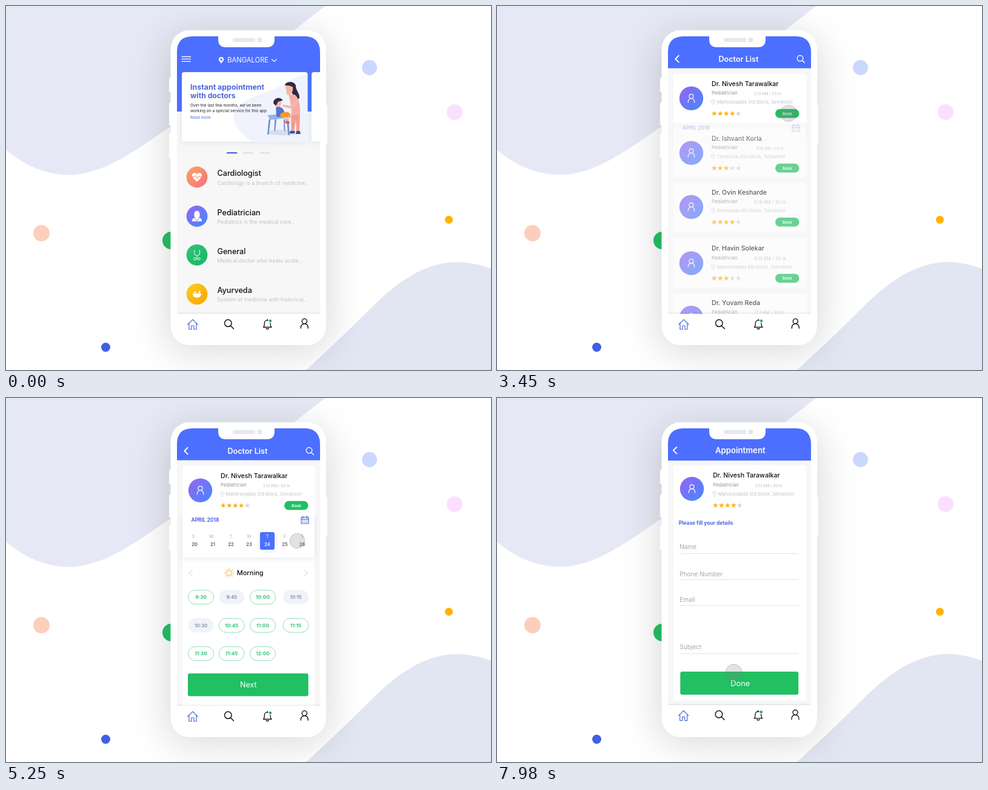
Write an HTML page that moves like this. It is 800x600 px and loops after 8 s.

```html
<!DOCTYPE html>
<html lang="en">
<head>
<meta charset="utf-8">
<title>Doctor booking app</title>
<style>
html, body { margin: 0; width: 100%; height: 100%; overflow: hidden; background: #fff; }
svg { display: block; width: 100vw; height: 100vh; font-family: Inter, "Open Sans", sans-serif; }
.line { fill: none; stroke-linecap: round; stroke-linejoin: round; }
</style>
</head>
<body>
<svg id="stage" viewBox="0 0 800 600"></svg>
<script>
const BLUE = '#4c6fff', GREEN = '#22bf63', INK = '#4a66dc';

// ---- markup helpers ----
const text = (x, y, size, str, fill = '#111', weight = 400, anchor = 'start') =>
  `<text x="${x}" y="${y}" font-size="${size}" fill="${fill}" font-weight="${weight}" text-anchor="${anchor}">${str}</text>`;
const mid = (x, y, size, str, fill, weight) => text(x, y, size, str, fill, weight, 'middle');
const rect = (x, y, w, h, r, fill, extra = '') =>
  `<rect x="${x}" y="${y}" width="${w}" height="${h}" rx="${r}" fill="${fill}" ${extra}/>`;
const circle = (x, y, r, fill, extra = '') => `<circle cx="${x}" cy="${y}" r="${r}" fill="${fill}" ${extra}/>`;
const line = (d, color, w = 1, extra = '') => `<path class="line" d="${d}" stroke="${color}" stroke-width="${w}" ${extra}/>`;
const shape = (d, fill) => `<path d="${d}" fill="${fill}" fill-rule="evenodd"/>`;
const group = (id, body) => `<g id="${id}">${body}</g>`;
const at = (x, y, body, s = 1) => `<g transform="translate(${x} ${y}) scale(${s})">${body}</g>`;
const grad = (id, a, b) => `<linearGradient id="${id}" x1="0.1" y1="0.1" x2="0.9" y2="0.9">
  <stop stop-color="${a}"/><stop offset="1" stop-color="${b}"/></linearGradient>`;

const person = (color, w) => line('M3.5 -3.4A3.5 3.5 0 1 1 -3.5 -3.4A3.5 3.5 0 1 1 3.5 -3.4M-5.3 6.6C-5.3 1.8 -2.6 .2 0 .2S5.3 1.8 5.3 6.6', color, w);
const lens = (x, y, r, color, w) =>
  circle(x, y, r, 'none', `stroke="${color}" stroke-width="${w}"`) +
  line(`M${x + r * .72} ${y + r * .72}l${r * .85} ${r * .85}`, color, w);
const pin = (x, y, s, color, w) =>
  at(x, y, line('M0 5C-2 2 -4 .5 -4 -1.5A4 4 0 0 1 4 -1.5C4 .5 2 2 0 5Z', color, w) + circle(0, -1.3, 1.3, 'none', `stroke="${color}" stroke-width="${w * .7}"`), s);

function star(x, y, fill) {
  let d = '';
  for (let i = 0; i < 10; i++) {
    const a = i * Math.PI / 5, r = i % 2 ? 1.9 : 4.6;
    d += (i ? 'L' : 'M') + (x + r * Math.sin(a)).toFixed(2) + ' ' + (y - r * Math.cos(a)).toFixed(2);
  }
  return shape(d + 'Z', fill);
}
const stars = n => [0, 1, 2, 3, 4].map(i => star(358.2 + i * 10, 177.3, i < n ? '#fdb30f' : '#d5d6dc')).join('');

// ---- doctor cards, laid out for the top slot ----
const doctors = [
  ['Dr. Nivesh Tarawalkar', '5.13 KM / 33 m', 'Manoravadda 3rd block, Selvanoor', 4, 0, 424, 6.4],
  ['Dr. Ishvant Korla', '6.16 KM / 33 m', 'Tarelihura 2nd block, Selvanoor', 3, 90, 428, 6.4],
  ['Dr. Ovin Kesharde', '6.18 KM / 33 m', 'Bhelupada 9th block, Selvanoor', 4, 179, 424, 7.5],
  ['Dr. Havin Solekar', '4.10 KM / 33 m', 'Manoravadda 6th block, Selvanoor', 3, 271.6, 424, 7.5],
  ['Dr. Yuvam Reda', '7.13 KM / 33 m', 'Tarelihura 6th block, Selvanoor', 4, 361.3, 424, 7.4]
];
const avatar = circle(320.5, 152.3, 19.7, 'url(#violet)') + at(320.5, 152.3, person('#fff', 1.2));
const info = ([name, dist, place, n, , x, size]) =>
  text(354, 131.5, 10.6, name, '#111', 500) + text(354, 146, 7.7, 'Pediatrician', '#8f91a0') +
  text(x, 147, size, dist, '#b9bac2') + pin(356.5, 158.5, .75, '#c6c7cd', .9) +
  text(362.5, 161.4, 7.6, place, '#c3c4ca') + stars(n);
const book = rect(459, 169.8, 39.5, 14.8, 7.4, GREEN) + mid(478.8, 179.6, 6.4, 'Book', '#fff', 600);
const cardBox = rect(291, 112, 219, 80.5, 3, '#fff');

// ---- home ----
const nurse = () =>
  `<ellipse cx="460" cy="208.5" rx="29" ry="4.5" fill="#d9dce8"/>` +
  shape('M434 186L431.5 212H434L437 186ZM464 186L467 213H469.5L467.5 186ZM444 186L443 206H445L447 186ZM459 186L460 206H462L461 186Z', '#6d8fd0') +
  shape('M432 179L466 176L472 183L436 187Z', '#8db4ea') +
  shape('M463 127C464 121 478 121 480 129C480 138 487 141 486 150C480 156 476 147 474 142Z', '#33264a') +
  shape('M462 129C466 123 476 126 475 134C475 142 469 147 465 144Z', '#f5b9a0') +
  shape('M461 128C464 121 476 122 476 132L470 129Z', '#33264a') +
  shape('M468 144H478C486 150 488 164 487 180L472 181C474 166 470 156 468 144Z', '#f7aca6') +
  shape('M472 179H487L486 206H481L480 187L477 206H472Z', '#f29c90') +
  shape('M471 206h7v4h-9zM481 206h6l1 5h-8z', '#364c9e') +
  shape('M481 151L485 158L472 168L457 164L458 161L471 163Z', '#f9b5ab') +
  shape('M446 166C453 162 459 167 461 175L458 182H447Z', '#5573cf') +
  circle(449.5, 158.5, 6, '#f5b9a0') +
  shape('M442 159C441 150 453 146 458 154L450 156L446 163Z', '#33264a') +
  shape('M453 178C457 173 468 171 471 178L470 183L455 183Z', '#f79a28') +
  line('M467 182L466 190M462 183L463 189', '#f5b9a0', 3) +
  shape('M462 189h6l2 4h-8z', '#e2504e');

const carousel = rect(290, 109, 207.5, 114.5, 4, '#fff', 'filter="url(#soft)"') + rect(504, 109, 40, 114.5, 4, '#fff', 'filter="url(#soft)"') +
  shape('M497 114C478 112 468 126 446 135C418 147 379 156 376 181C374 200 392 213 405 223H494Q497 223 497 220Z', '#f0f3fc') +
  text(304, 138.3, 12.4, 'Instant appointment', INK, 700) + text(304, 152.3, 12.2, 'with doctors', INK, 700) +
  text(304, 166, 6.6, "Over the last few months, we've been", '#222') +
  text(304, 174.8, 6.6, 'working on a special service for this app', '#222') +
  text(304, 186, 6.6, 'Read more', INK) + at(12.5, 6.3, nurse(), .97) +
  [364, 390.5, 418].map((x, i) => rect(x, 241, 17.5, 2.2, 1, i ? '#dfe0e4' : INK)).join('');

const rowIcons = [
  shape('M0 7.5C-5 3.5 -8 0 -8 -3C-8 -7.5 -2 -8.5 0 -4.5C2 -8.5 8 -7.5 8 -3C8 0 5 3.5 0 7.5Z', '#fff') + line('M-8 -.5H-3L-1.5 -3L.5 3L2 -.5H8', '#f68a70', 1),
  shape('M-4.5 1C-5 -5 -4 -9 0 -9S5 -5 4.5 1L2 2L7 4Q8 5 8 8.5H-8Q-8 5 -7 4L-2 2Z', '#fff') + line('M-3 4L0 7.5L3 4', '#7b72f6', 1),
  line('M-3 -7H-4.5V-4C-4.5 -.5 -2.5 1 0 1S4.5 -.5 4.5 -4V-7H3M0 1V4.5M-1.2 6.5A2 2 0 1 1 -5.2 6.5A2 2 0 1 1 -1.2 6.5H1.2A2 2 0 1 0 5.2 6.5A2 2 0 1 0 1.2 6.5', '#d8f6e5', 1.1),
  shape('M-7 -1H7C7 4 4 6 0 6S-7 4 -7 -1ZM2 -1.5L4.5 -6L6.2 -5L4.5 -1.5ZM-6 -2C-6 -5 -1 -5 -1 -2Z', '#fff')
];
const rows = [
  ['Cardiologist', 'Cardiology is a branch of medicine..', 282, 'coral'],
  ['Pediatrician', 'Pediatrics is the medical care..', 346.5, 'violet'],
  ['General', 'Medical doctor who treats acute..', 410.3, 'leaf'],
  ['Ayurveda', 'System of medicine with historical..', 474.8, 'gold']
].map(([a, b, y, g], i) => circle(315, y, 17.4, `url(#${g})`) + at(315, y, rowIcons[i]) +
  text(348.5, y - 1.7, 12.6, a, '#111', 500) + text(348.5, y + 12.6, 8.8, b, '#c2c3c7')).join('');

const homeHead = line('M290 83.5H304.5M290 87.4H304.5M290 91.3H304.5', '#fff', 1.3) +
  at(355, 89.5, shape('M0 5.5C-2 2.5 -4.2 .8 -4.2 -1.4A4.2 4.2 0 0 1 4.2 -1.4C4.2 .8 2 2.5 0 5.5ZM1.8 -1.4A1.8 1.8 0 1 0 -1.8 -1.4A1.8 1.8 0 1 0 1.8 -1.4Z', '#fff')) +
  text(365.3, 93.4, 11.2, 'BANGALORE', '#fff') + line('M438.5 88L442.3 91.5L446 88', '#fff', 1.2);

// ---- booking ----
const cols = [311, 341, 371, 401, 431, 460, 488.5];
const dateNum = d => {
  const n = d + 1;
  return mid(cols[n % 7], 243.9 + 22.6 * Math.floor(n / 7), 7.5, d, d === 24 ? '#fff' : '#555', 600);
};
const days = (from, to) => Array.from({ length: to - from + 1 }, (_, i) => dateNum(from + i)).join('');
const weekdays = [...'SMTWTFS'].map((c, i) => mid(cols[i] - (i < 2 ? 2 : 0), 230.7, 7.3, c, '#b0b1b8')).join('');
const calIcon = line('M487 196.5H499V207H487ZM487 199.8H499M489.8 194.5V198M496.2 194.5V198', INK, 1.2) +
  line('M489.5 202.5H496.8M489.5 204.8H496.8', INK, 1.2, 'stroke-dasharray=".6 2.7"');

const sunRays = Array.from({ length: 8 }, (_, i) => {
  const a = i * Math.PI / 4, c = Math.cos(a), s = Math.sin(a);
  return `M${6 * c} ${6 * s}L${7.6 * c} ${7.6 * s}`;
}).join('');
const slotRows = [['9:30', '-9:45', '10:00', '-10:15'], ['-10:30', '10:45', '11:00', '11:15'], ['11:30', '11:45', '12:00']];
const slot = (str, x, y) => str[0] === '-'
  ? rect(x - 21, y - 11.7, 42, 23.4, 11.7, '#f0f4fa') + mid(x, y + 3, 8, str.slice(1), '#747c92', 500)
  : rect(x - 21, y - 11.5, 42, 23, 11.5, '#fff', 'stroke="#93ddb3"') + mid(x, y + 3, 8.2, str, '#33c775', 700);
const slots = line('M307 283.5L302.3 288.5L307 293.5M492.3 283.5L497 288.5L492.3 293.5', '#cfd0d6') +
  at(368, 288.5, circle(0, 0, 4, 'none', 'stroke="#f8b233" stroke-width="1.1"') + line(sunRays, '#f8b233', 1.1)) +
  text(380.7, 292.4, 11, 'Morning', '#111', 500) +
  slotRows.map((r, j) => r.map((s, i) => slot(s, [321.6, 372.2, 423.5, 478][i], 328.3 + j * 46.5)).join('')).join('') +
  rect(300, 454, 198.7, 37.6, 3, GREEN) + mid(399.8, 477.3, 12.6, 'Next', '#fff');

// ---- details form ----
const fields = [['Name', 249, 256.5], ['Phone Number', 293.7, 299.5], ['Email', 336.3, 342], ['Subject', 413.8, 421.5]]
  .map(([s, y, ly], i) => group('field' + i, text(301.3, y, 10, s, '#a5a6ac') + line(`M302 ${ly}H497`, '#e2e3e6', 1))).join('');

const nav = rect(282, 507.5, 236, 42, 0, '#fff', 'filter="url(#edge)"') +
  line('M299.8 525L308 516.8L316.2 525M302 523.5V533H306V527H310V533H314V523.5', INK, 1.2) +
  lens(366.3, 522.8, 5.8, '#111', 1.5) +
  line('M424.5 529.5C426.5 528 426.3 526 426.3 523C426.3 516.5 436 516.5 436 523C436 526 436 528 438 529.5ZM429 531.5Q431.2 533.5 433.4 531.5M431.2 516.5V518', '#111', 1.3) +
  circle(436, 519, 3.2, '#fff') + circle(436, 519, 2.3, '#22b45d') +
  at(492.3, 523.6, person('#111', 1.2), 1.15);

document.getElementById('stage').innerHTML = `<defs>
  ${grad('violet', '#8c69f4', '#4d84fc')}${grad('coral', '#faa065', '#f6757a')}${grad('leaf', '#2cc278', '#1db962')}${grad('gold', '#fccb1a', '#fba60a')}
  <filter id="blur" x="-60%" y="-40%" width="220%" height="180%"><feGaussianBlur stdDeviation="32"/></filter>
  <filter id="soft" x="-20%" y="-20%" width="140%" height="140%"><feDropShadow dx="0" dy="2" stdDeviation="4" flood-color="#5a78a8" flood-opacity=".16"/></filter>
  <filter id="edge" x="-5%" y="-20%" width="110%" height="140%"><feDropShadow dx="0" dy="-1" stdDeviation="1" flood-color="#000" flood-opacity=".13"/></filter>
  <clipPath id="screen"><path d="M282 549V76Q282 50 308 50H492Q518 50 518 76V549Z"/></clipPath>
  <clipPath id="fold"><rect id="foldBox" x="291" y="190" width="218" height="73"/></clipPath>
</defs>` +
  rect(0, 0, 800, 600, 0, '#fff') +
  shape('M0 0H527C450 58 350 140 272 198C225 230 165 278 104 278.5C62 278 28 261 0 237Z', '#e6e9f5') +
  shape('M495 600C530 568 565 535 602 498C645 455 690 423 742 422C764 422 783 427 800 433V600Z', '#e2e6f2') +
  rect(266, 50, 267, 520, 34, '#000', 'opacity=".15" filter="url(#blur)"') +
  circle(599.5, 101.5, 12.5, '#ccd7ff') + circle(740, 175, 13, '#fae0fe') + circle(730.5, 352.3, 6.5, '#ffb202') +
  circle(58.5, 374.5, 13.5, '#fbcfbc') + circle(164.5, 562.5, 7.5, '#4060e2') + circle(272.5, 386.5, 14.5, '#22b45d') +
  [[269, 118, 24], [269, 159, 38], [269, 210, 41], [525.5, 163, 64]].map(([x, y, h]) => rect(x, y, 4.5, h, 1.5, '#fdfdfd')).join('') +
  rect(271.5, 40, 256.5, 519, 31, '#fff') +
  `<g clip-path="url(#screen)">` + rect(282, 50, 236, 458, 0, '#f7f7f7') +
  group('rows', rows) +
  doctors.slice(1).map((d, i) => group('card' + (i + 1), at(0, d[4], cardBox + avatar + info(d) + book))).join('') +
  group('sheet', rect(291, 112, 218, 400, 3, '#fff')) + group('slots', slots) +
  group('panel', `<rect id="panelBox" x="291" y="192" width="218" height="71" fill="#fff" filter="url(#soft)"/><g clip-path="url(#fold)">` +
    text(305.5, 204.3, 8.3, 'APRIL 2018', INK, 700) + calIcon + weekdays +
    group('sel', rect(419, 221, 24, 29, 3, BLUE, 'filter="url(#soft)"')) + group('selDay', mid(431, 230.7, 7.3, 'T', '#fff')) +
    group('week', days(20, 26)) + group('month', days(1, 19) + days(27, 30)) + '</g>') +
  group('form', rect(291, 111, 219, 387.5, 3, '#fff')) +
  group('card0', group('box0', cardBox) + group('face', avatar) + group('info', info(doctors[0])) + group('book', book)) +
  group('hint', text(299.8, 208.8, 8.4, 'Please fill your details', INK, 700)) + fields +
  group('done', rect(302.3, 451, 194.9, 38, 3, GREEN) + mid(401.3, 474.8, 12.8, 'Done', '#fff')) +
  `<rect id="head" x="282" y="50" width="236" height="124" fill="${BLUE}"/>` +
  group('carousel', carousel) + group('homeHead', homeHead) +
  group('back', line('M299.8 81.8L294.3 87.2L299.8 92.6', '#fff', 1.9)) +
  group('title', mid(398.4, 91.7, 12.6, 'Doctor List', '#fff', 600) + lens(500, 86.3, 4.8, '#fff', 1.4)) +
  group('title2', mid(401.3, 91, 13.2, 'Appointment', '#fff', 600)) +
  group('nav', nav) + '</g>' +
  shape('M350 49H443V55Q443 68 430 68H363Q350 68 350 55Z', '#fff') +
  rect(374, 52.7, 37, 6.6, 3.3, '#e8e8ec') + circle(418.5, 56, 4, '#e6e6ea') +
  `<circle id="touch" fill="#808080" fill-opacity=".23" stroke="#777" stroke-opacity=".33"/>`;

// ---- motion ----
const el = {};
document.querySelectorAll('[id]').forEach(n => el[n.id] = n);
const clamp = v => Math.max(0, Math.min(1, v));
const ease = p => p * p * (3 - 2 * p);
const drop = p => 18 * (1 - p) ** 2;

function put(id, alpha, dx = 0, dy = 0) {
  const n = el[id];
  n.style.display = alpha > 0 ? '' : 'none';
  n.setAttribute('opacity', clamp(alpha));
  n.setAttribute('transform', `translate(${dx} ${dy})`);
}

// time, x, y, radius
const path = [
  [780, 504, 398, 14], [1050, 415, 342, 14], [2550, 415, 342, 14], [2910, 481, 177, 14],
  [4770, 481, 177, 14], [4950, 480.5, 235.5, 12.8], [5940, 480.5, 235.5, 12.8],
  [6180, 400, 473, 13.2], [7950, 400, 473, 13.2], [7980, 391, 453, 14], [8010, 382, 433, 14]
];
function touchAt(t) {
  let i = 0;
  while (i < path.length - 2 && t > path[i + 1][0]) i++;
  const a = path[i], b = path[i + 1], p = clamp((t - a[0]) / (b[0] - a[0]));
  return [1, 2, 3].map(j => a[j] + (b[j] - a[j]) * p);
}

function draw(t) {
  const k = (start, dur) => clamp((t - start) / dur);

  // home to list
  const home = 1 - k(1230, 330), e1 = ease(k(1230, 780));
  put('rows', home, 0, -12 * (1 - home));
  put('carousel', home, 0, -12 * (1 - home));
  put('homeHead', 1 - 1.2 * k(1230, 780), 0, -30 * e1);

  // list to booking, then to the form
  const leave = 1 - k(6540, 330), e3 = ease(k(6600, 780));
  const titleIn = k(1300, 450), titleY = 22 * (1 - e1);
  put('title', titleIn * leave, 0, titleY - 15 * (1 - leave));
  put('back', k(1300, 350), -3.5 * e3, titleY - .8 * e3);
  for (let i = 0; i < 5; i++) {
    const p = k(1440 + 92 * i, 350), shown = p ** 1.6;
    put('card' + i, i ? shown * (1 - k(3360, 270)) : shown, 0, drop(p));
  }
  put('box0', 1);
  put('face', 1, e3, -2.6 * e3);
  put('info', 1, 2.2 * e3, -.3 * e3);
  put('book', leave);

  const open = 1 - (1 - k(3390, 390)) ** 3, grow = ease(k(5250, 480));
  const selIn = k(3610, 400), slotIn = k(3560, 700);
  const height = 71 * open + 100 * grow;
  put('sheet', k(3450, 450) * leave);
  put('slots', slotIn * leave, 0, -drop(slotIn) - 12 * (1 - leave));
  put('panel', k(3390, 240) * leave);
  el.panelBox.setAttribute('height', height);
  el.foldBox.setAttribute('height', height + 2);
  put('sel', selIn * .5 + selIn ** 2 * .5, 0, 73 * grow - drop(selIn));
  put('selDay', selIn * (1 - grow * 2));
  put('week', k(3450, 250), 0, -67.8 * (1 - grow));
  put('month', k(5400, 300));

  put('form', k(6720, 360));
  put('title2', k(6810, 400), 0, 22 * (1 - e3));
  ['hint', 'field0', 'field1', 'field2', 'field3', 'done'].forEach((id, i) => {
    const p = k(6900 + 90 * i, 390);
    put(id, p ** 1.6, 0, drop(p));
  });
  put('nav', 1, -.3 * e3, -1.4 * e3);
  const shrink = 1 - (1 - k(1230, 560)) ** 3;
  el.head.setAttribute('height', 124 - 71.4 * shrink + .6 * e3);

  const [x, y, r] = touchAt(t);
  put('touch', k(780, 90), x, y);
  el.touch.setAttribute('r', r - .5);
}

const began = performance.now();
function tick() {
  draw((performance.now() - began) % 8000);
  requestAnimationFrame(tick);
}
draw(0);
requestAnimationFrame(tick);
</script>
</body>
</html>
```
